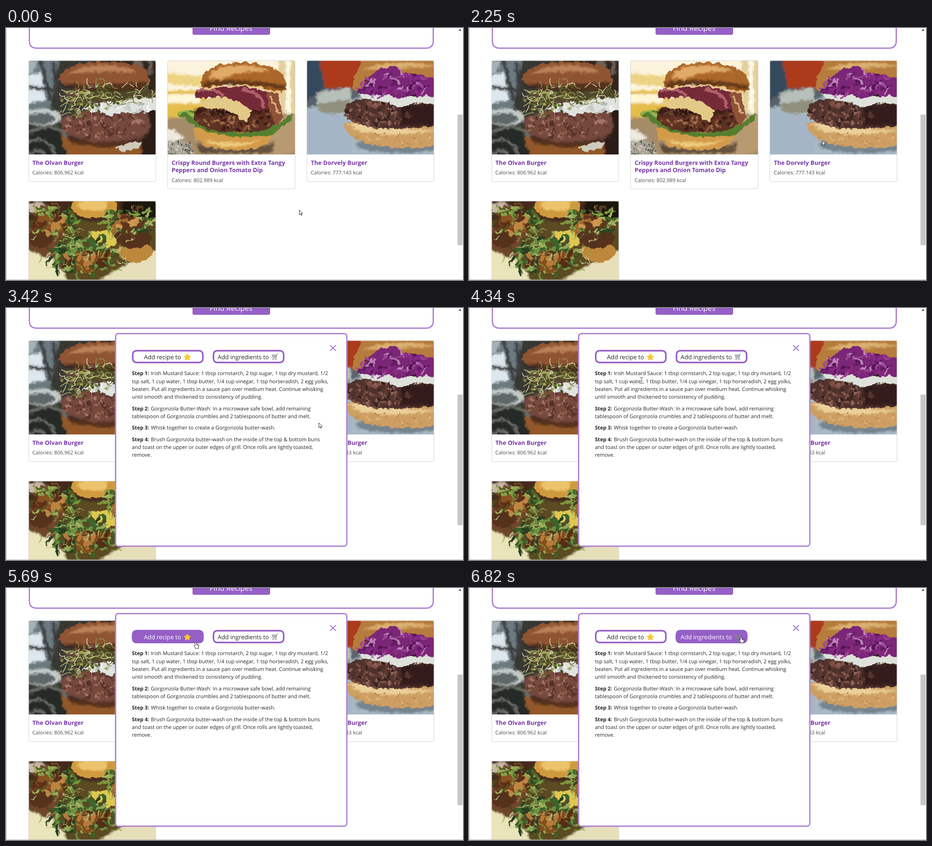
These frames come from a looping animation (1007x556 px, 8000 ms). An HTML page:

```html
<!DOCTYPE html>
<html lang="en">
<head>
<meta charset="utf-8">
<title>Recipe finder</title>
<style>
html, body { margin: 0; width: 100%; height: 100%; overflow: hidden; background: #fff; }
#stage { display: block; width: 1007px; height: 556px; }
text { font: 11.4px "Open Sans", "Noto Sans", sans-serif; fill: #212529; text-rendering: geometricPrecision; white-space: pre; }
.title { font-size: 13px; font-weight: 700; fill: #7636a9; }
.calories { font-size: 11.3px; fill: #4a4d52; }
.button { font-size: 13.2px; }
.light { fill: #fff; }
.bold { font-weight: 700; }
.card { fill: none; stroke: #d3d3d3; }
.frame { fill: none; stroke: #b085d2; stroke-width: 3; }
.shade { fill: #1c0e08; opacity: .5; filter: url(#soft); }
</style>
</head>
<body>
<svg id="stage" viewBox="0 0 1007 556">
  <defs>
    <filter id="soft"><feGaussianBlur stdDeviation="2.2"/></filter>
    <filter id="organic" x="0" y="0" width="1" height="1">
      <feTurbulence type="fractalNoise" baseFrequency=".09" numOctaves="3" seed="4"/>
      <feDisplacementMap in="SourceGraphic" scale="11" xChannelSelector="R" yChannelSelector="G"/>
    </filter>
  </defs>
  <path d="M51.5-20V28Q51.5 44.5 68 44.5H925Q941.5 44.5 941.5 28V-20" class="frame"/>
  <rect x="411" y="-20" width="171" height="35" rx="4" fill="#9560c6"/>
  <text x="496" y="5.8" text-anchor="middle" class="light" style="font-size:16.2px">Find Recipes</text>

  <svg x="50" y="72" width="280" height="207" viewBox="50 72 280 207">
    <rect x="50" y="72" width="280" height="207" fill="#383833"/>
    <g filter="url(#organic)">
      <g filter="url(#soft)">
        <path d="M40 62H118L98 178 40 190Z" fill="#6c7a80"/>
        <path d="M40 108L78 98 88 160 40 168Z" fill="#dde7ee"/>
        <path d="M40 72H72L60 100H40Z" fill="#a5b2b8"/>
        <path d="M74 62L98 160M104 72L112 150M50 130L110 138" stroke="#3c3d3c" stroke-width="8"/>
        <path d="M190 62H340V140L290 150Z" fill="#33261f"/>
        <path d="M280 62H300V90H280ZM314 62H322V104H314Z" fill="#6d625a"/>
        <ellipse cx="80" cy="197" rx="42" ry="19" fill="#c3cbcb"/>
        <ellipse cx="76" cy="200" rx="32" ry="13" fill="#5f6766"/>
        <path d="M40 222H150V289H40Z" fill="#272a28"/>
        <path d="M40 236Q95 205 124 230T142 289M40 256Q92 226 112 289M48 289Q72 248 88 289" fill="none" stroke="#7c8078" stroke-width="4"/>
        <path d="M120 236Q200 268 302 240L306 290H138Z" fill="#93592b"/>
        <path d="M298 180H340V289H298Z" fill="#2c1d16"/>
        <path d="M122 200Q210 160 312 186 326 222 300 246 215 268 140 240 115 222 122 200Z" fill="#754a3c"/>
      </g>
      <g data-scatter="130 216 215 88 30 8 5" data-colors="#8d6050 #54302a #a3766a #65392e #7a4a3c"></g>
      <path d="M136 236Q215 268 300 240L298 254Q210 272 140 252Z" class="shade"/>
      <path d="M128 138Q200 118 330 138V172Q230 182 140 170Z" fill="#504729"/>
      <path d="M168 180Q200 156 226 168 270 150 340 156V184Q301 180 282 190 250 182 236 194 200 184 168 180Z" fill="#dfe2de"/>
      <g data-scatter="28 252 176 78 14 12 4" data-colors="#aeb7b4 #f4f6f3 #c6ccc6"></g>
      <path d="M240 264Q262 252 300 250L292 266 256 272Z" fill="#cfcabb"/>
      <path d="M114 116Q124 82 182 76 268 70 306 90 322 106 312 128 278 140 216 135 145 140 114 116Z" fill="#8f5432"/>
      <path d="M120 122Q200 130 314 118L312 130Q278 142 216 138 145 140 120 122Z" class="shade"/>
      <path d="M135 103Q166 79 232 82 275 85 288 100 208 92 135 103Z" fill="#bb8159" filter="url(#soft)"/>
    </g>
    <g data-scatter="80 228 148 104 24 24 1.5" data-colors="#d3cf99 #8a9350 #e6e0be #5a6a34 #9a9a58"></g>
    <g data-scatter="46 150 168 34 32 26 1.5" data-colors="#bcbf78 #dedcb0 #667438"></g>
    <g data-scatter="40 190 155 74 30 5 5" data-colors="#687c37 #a6a951 #6d4540 #4d5628"></g>
  </svg>

  <svg x="356" y="72" width="281" height="207" viewBox="356 72 281 207">
    <rect x="356" y="72" width="281" height="207" fill="#fbf3dc"/>
    <g filter="url(#organic)">
      <g filter="url(#soft)">
        <path d="M346 98L436 108V130L346 122Z" fill="#edd384"/>
        <path d="M346 138H440V200H346Z" fill="#e4bd4c"/>
        <path d="M346 146H430V166H346Z" fill="#fff6d6"/>
        <path d="M600 62H650V190H604Z" fill="#e3cf9a"/>
        <path d="M622 62V190" stroke="#fffbea" stroke-width="9"/>
        <path d="M346 200Q490 183 650 190V290H346Z" fill="#a58c69"/>
        <path d="M560 205L650 190V260L602 290H540Z" fill="#b79a70"/>
        <path d="M346 236Q364 226 384 246L404 258 424 290H346Z" fill="#a9a497"/>
        <path d="M346 226Q372 218 392 244L372 250 346 248Z" fill="#efe9de"/>
      </g>
      <g data-scatter="80 376 266 40 15 3 2.5" data-colors="#4f4f4a #d5cebf #817b72"></g>
      <path d="M420 255Q500 285 592 252L586 276H430Z" class="shade"/>
      <path d="M414 218Q500 236 592 220 590 256 546 267 458 274 426 252 414 238 414 218Z" fill="#d39b4a"/>
      <path d="M434 246Q492 260 562 246 529 264 483 262 449 259 434 246Z" fill="#f0cc82" filter="url(#soft)"/>
      <path d="M378 188Q396 176 416 184L424 206 448 222 520 232 602 212 630 188 626 205 588 234 556 240 500 240 443 228 404 208Z" fill="#557f2d"/>
      <path d="M380 186Q402 178 416 198L432 216" fill="none" stroke="#93b850" stroke-width="6"/>
      <path d="M413 190Q424 164 492 165 563 155 600 179 606 207 582 222 538 234 466 228 414 219 413 190Z" fill="#5c3022"/>
      <g data-scatter="120 505 198 84 28 6 5" data-colors="#8b5238 #3a1c16 #a3704c #6a3826"></g>
      <path d="M416 176Q500 190 592 170L594 184Q500 200 416 190Z" class="shade"/>
      <path d="M572 140L600 140 604 173 610 199 598 218 582 190Z" fill="#8f5238"/>
      <path d="M582 151L602 190" stroke="#deb084" stroke-width="4"/>
      <path d="M416 139Q438 124 482 132L529 124 576 142 578 180 531 183 493 157 419 154Z" fill="#742a39"/>
      <path d="M421 139Q456 127 477 149M520 136Q563 139 568 177" fill="none" stroke="#b0606c" stroke-width="7"/>
      <path d="M427 165L467 151 500 157 541 181 531 205Q514 208 508 191L477 178 441 178Z" fill="#e3c987"/>
      <path d="M428 128Q430 90 475 80 550 68 598 93 620 108 616 137L600 144 574 138Q530 123 480 124L448 134Z" fill="#ab6629"/>
      <path d="M432 120Q520 108 612 126L614 138Q530 118 434 132Z" class="shade"/>
      <path d="M445 108Q461 82 510 82 560 80 580 97 518 92 473 114Z" fill="#e0aa68" filter="url(#soft)"/>
      <path d="M438 135Q515 116 606 144" fill="none" stroke="#e9c88d" stroke-width="4"/>
    </g>
  </svg>

  <svg x="663" y="72" width="280" height="207" viewBox="663 72 280 207">
    <rect x="663" y="72" width="280" height="207" fill="#a9b9c5"/>
    <g filter="url(#organic)">
      <g filter="url(#soft)">
        <path d="M653 62H778V155L653 178Z" fill="#59626a"/>
        <path d="M688 62H784V130L703 134 690 110Z" fill="#ac3a1a"/>
        <path d="M653 62H689L702 132 653 168Z" fill="#35495d"/>
        <path d="M685 144L758 130 766 178 693 190 685 168Z" fill="#b7bfb9"/>
        <path d="M685 168L758 156 757 184 693 192Z" fill="#8f8f7c"/>
        <path d="M653 180Q725 186 770 208L756 289H653Z" fill="#a4b5c6"/>
        <path d="M850 110H953V230H846Z" fill="#201817"/>
        <ellipse cx="866" cy="258" rx="96" ry="18" fill="#74848f"/>
      </g>
      <path d="M743 210Q780 200 848 212L953 216V258Q881 272 806 258 752 246 743 210Z" fill="#cd9f62"/>
      <path d="M751 213Q781 204 850 220L953 226 850 238 784 229Z" fill="#ecd09a" filter="url(#soft)"/>
      <g data-scatter="50 850 244 90 16 5 3" data-colors="#b98a50 #e0b97c #c79558"></g>
      <path d="M746 179Q753 154 805 157L953 160V216Q862 226 805 219 748 208 746 179Z" fill="#50332d"/>
      <g data-scatter="110 820 190 72 30 8 5" data-colors="#7d5147 #33201c #936255 #5f3a32"></g>
      <path d="M868 168H953V216H868Z" class="shade"/>
      <path d="M778 146Q816 134 856 149L953 150V168L899 166 869 176 844 165 786 156Z" fill="#dde1da"/>
      <path d="M764 134Q764 90 798 62H953V108L800 118 780 142Z" fill="#b67b3d"/>
      <path d="M785 93Q816 76 895 76L953 84 852 90Z" fill="#dbb070" filter="url(#soft)"/>
      <path d="M775 143L800 106 826 90 862 84 869 98 953 112V152L895 146 867 157 837 146 804 149Z" fill="#7b2878"/>
      <g data-scatter="56 857 126 74 24 26 4" data-colors="#9c4698 #511950 #bd82b8 #8a2c86 #651d66"></g>
    </g>
  </svg>

  <svg x="50" y="382" width="280" height="174" viewBox="50 382 280 174">
    <rect x="50" y="382" width="280" height="174" fill="#5b4a22"/>
    <g filter="url(#organic)">
      <g filter="url(#soft)">
        <path d="M40 372H340V425H40Z" fill="#452a1c"/>
        <path d="M256 372H340V420H256Z" fill="#1e1511"/>
        <path d="M40 388L82 384 90 400 40 412Z" fill="#c9b8a4"/>
        <path d="M40 490L96 500 146 566H40Z" fill="#ebe4bb"/>
        <path d="M292 508L340 485V566H190L250 530Z" fill="#e7dfba"/>
        <path d="M40 437H126V498L83 506 40 480Z" fill="#70452a"/>
      </g>
      <ellipse cx="195" cy="394" rx="51" ry="26" fill="#cf993c"/>
      <ellipse cx="190" cy="391" rx="34" ry="13" fill="#ecc46e" filter="url(#soft)"/>
      <ellipse cx="284" cy="492" rx="40" ry="24" fill="#be883b"/>
      <ellipse cx="278" cy="464" rx="42" ry="22" fill="#54301f"/>
      <ellipse cx="76" cy="464" rx="28" ry="20" fill="#54301f"/>
      <path d="M186 450L234 445 246 475 210 494Z" fill="#dfc650"/>
      <g data-scatter="70 100 424 56 28 24 5" data-colors="#45702b #77963f #2f4a20 #9dac58 #6b4a24"></g>
      <g data-scatter="74 272 426 56 30 24 5" data-colors="#41692a #7d9a42 #2a4420 #a4b465 #5b3c20"></g>
      <g data-scatter="110 165 503 72 40 26 6" data-colors="#3b642b #6a9040 #263f20 #94a859 #4c4a20"></g>
      <g data-scatter="22 98 432 40 20 18 9" data-colors="#8a5124 #bd8543 #5a3019"></g>
      <g data-scatter="18 266 430 36 16 21 9" data-colors="#a26a2d #cf9850 #5e361a"></g>
      <g data-scatter="26 180 515 52 24 20 9" data-colors="#84501f #b67a3a #522e18"></g>
      <g data-scatter="50 178 480 118 62 30 1.5" data-colors="#c2cb88 #88a34c"></g>
    </g>
  </svg>

  <path d="M50 279V76Q50 72 54 72H326Q330 72 330 76V335Q330 339 326 339H54Q50 339 50 335Z" class="card"/>
  <rect x="356" y="72" width="281" height="283" rx="4" class="card"/>
  <rect x="663" y="72" width="280" height="267" rx="4" class="card"/>
  <rect x="50" y="382" width="280" height="220" rx="4" class="card"/>
  <text x="58.3" y="301.5" class="title">The Olvan Burger</text>
  <text x="58" y="323" class="calories">Calories: 806.962 kcal</text>
  <text x="365" y="301.5" class="title">Crispy Round Burgers with Extra Tangy</text>
  <text x="365" y="318" class="title">Peppers and Onion Tomato Dip</text>
  <text x="365" y="339.5" class="calories">Calories: 802.989 kcal</text>
  <text x="671.7" y="301.5" class="title">The Dorvely Burger</text>
  <text x="671.5" y="323" class="calories">Calories: 777.143 kcal</text>

  <rect x="994" width="13" height="556" fill="#fdfdfd"/>
  <rect x="995" y="191" width="11" height="288" fill="#c6c6c6"/>
  <path d="M997 6L1000.5 2 1004 6Z" fill="#505050"/>
  <path d="M.5 0V555.5H1007" fill="none" stroke="#b2b2b2"/>

  <g id="modal">
    <rect x="241.5" y="56.5" width="509.5" height="469" rx="6" class="frame" style="fill:#fff"/>
    <path d="M714 82L727 94.5M727 82L714 94.5" stroke="#a979d0" stroke-width="2.2"/>
    <g id="buttons"></g>
    <path d="M399.5 101L401.8 105.5 407 106.3 403.3 110 404.1 115 399.5 112.7 394.9 115 395.7 110 392 106.3 397.2 105.5Z" fill="#fbcb32" stroke="#f6bf28" stroke-linejoin="round"/>
    <g fill="none" stroke="#7d8489">
      <path d="M599.5 101.5H597L594.8 111.5H587.5M586 103.5H596L594.5 109H587.5ZM586.5 106H595.5M589 103.5L590 109M592.7 103.5L592.2 109"/>
      <circle cx="588.5" cy="113.6" r="1.1"/><circle cx="595" cy="113.6" r="1.1"/>
    </g>
    <g id="steps"></g>
  </g>
  <g id="cursor" fill="#fff" stroke="#111" stroke-width=".9" stroke-linejoin="round">
    <path id="arrow" d="M.4.5V11.2L2.8 8.9 4.6 12.6 6.2 11.9 4.5 8.3H7.8Z"/>
    <path id="hand" d="M-1.4 7.8V1Q0-.9 1.4 1V5L5.5 5.8Q7.3 6.2 7.1 8.2L6.4 11.5V14.2H-1V12.2L-4 8.5Q-3.4 6.6-1.4 8.4ZM3 5.4V8M5 5.8V8.2"/>
    <g id="beam" fill="none">
      <path d="M-3-6.3H3M-3 6.3H3M0-6V6" stroke="#fff" stroke-width="2.6"/>
      <path d="M-3.2-6.3H-.8L0-5.7 .8-6.3H3.2M-3.2 6.3H-.8L0 5.7 .8 6.3H3.2M0-5.7V5.7" stroke="#333"/>
    </g>
  </g>
</svg>
<script>
const LOOP = 8000, MODAL_OPENS = 2280, HOVER_FADE = 300;
const $ = id => document.getElementById(id);
const clamp = v => Math.min(1, Math.max(0, v));

// Photo texture: curved strokes spread over an ellipse.
// data-scatter holds: count cx cy rx ry length width
let seed = 7;
const random = () => (seed = seed * 16807 % 2147483647) / 2147483647;
for (const group of document.querySelectorAll('[data-scatter]')) {
  const [count, cx, cy, rx, ry, length, width] = group.dataset.scatter.split(' ').map(Number);
  const colors = group.dataset.colors.split(' ');
  let strokes = '';
  for (let i = 0; i < count; i++) {
    const radius = Math.sqrt(random()), around = random() * 2 * Math.PI, turn = random() * 2 * Math.PI;
    const x = cx + rx * radius * Math.cos(around), y = cy + ry * radius * Math.sin(around);
    const size = length * (.4 + .6 * random()), bend = size * (random() - .5);
    const dx = size * Math.cos(turn), dy = size * Math.sin(turn) * .7;
    strokes += `<path d="M${x} ${y}q${dx / 2 - bend} ${dy / 2 + bend} ${dx} ${dy}" stroke="${colors[i % colors.length]}"/>`;
  }
  group.innerHTML = `<g fill="none" stroke-linecap="round" stroke-width="${width}">${strokes}</g>`;
}

const steps = [
  ['Irish Mustard Sauce: 1 tbsp cornstarch, 2 tsp sugar, 1 tsp dry mustard, 1/2',
   'tsp salt, 1 cup water, 1 tbsp butter, 1/4 cup vinegar, 1 tsp horseradish, 2 egg yolks,',
   'beaten. Put all ingredients in a sauce pan over medium heat. Continue whisking',
   'until smooth and thickened to consistency of pudding.'],
  ['Gorgonzola Butter-Wash: In a microwave safe bowl, add remaining',
   'tablespoon of Gorgonzola crumbles and 2 tablespoons of butter and melt.'],
  ['Whisk together to create a Gorgonzola butter-wash.'],
  ['Brush Gorgonzola butter-wash on the inside of the top &amp; bottom buns',
   'and toast on the upper or outer edges of grill. Once rolls are lightly toasted,',
   'remove.'],
];
let baseline = 148.4;
$('steps').innerHTML = steps.map((lines, i) => {
  const html = lines.map((line, j) => {
    const lead = j ? '' : `<tspan class="bold">Step ${i + 1}:</tspan><tspan x="319.2">`;
    return `<text x="277.5" y="${baseline + j * 17.15}">${lead}${line}${j ? '' : '</tspan>'}</text>`;
  }).join('');
  baseline += lines.length * 17.15 + 8.5;
  return html;
}).join('');

const buttons = [
  { x: 277.5, textX: 304, label: 'Add recipe to', enter: 4500, leave: 5715 },
  { x: 455.5, textX: 466.3, label: 'Add ingredients to', enter: 6520, leave: LOOP },
];
$('buttons').innerHTML = buttons.map(({ x, textX, label }) => `
  <rect x="${x + 1.75}" y="94.25" width="154.5" height="26" rx="8" fill="#fff" stroke="#9560c6" stroke-width="3.5"/>
  <text x="${textX}" y="112.6" class="button">${label}</text>
  <g class="hover">
    <rect x="${x}" y="92.5" width="158" height="29.5" rx="9.5" fill="#9560c6"/>
    <text x="${textX}" y="112.6" class="button light">${label}</text>
  </g>`).join('');
const hovers = document.querySelectorAll('.hover');
const textBoxes = [...$('steps').children].map(line => line.getBBox());

const ease = {
  hold: () => 0,
  linear: u => u,
  start: u => u * u,
  stop: u => u * (2 - u),
  both: u => u * u * (3 - 2 * u),
};
// time, x, y, easing towards the next point
const route = [
  [0, 646, 401, 'hold'], [470, 646, 401, 'both'], [1080, 778, 248, 'hold'],
  [3060, 778, 248, 'start'], [3420, 691, 253, 'stop'], [3820, 377, 236.5, 'hold'],
  [4160, 377, 236.5, 'start'], [4340, 380, 160, 'stop'], [4600, 412, 115.5, 'hold'],
  [5610, 412, 115.5, 'both'], [6270, 545, 198, 'linear'], [6400, 563, 184, 'hold'],
  [6430, 563, 184, 'both'], [6570, 598.5, 106.5, 'hold'], [LOOP, 598.5, 106.5, 'hold'],
];

function cursorAt(t) {
  const i = route.findIndex(point => point[0] > t) - 1;
  const [t0, x0, y0, easing] = route[i], [t1, x1, y1] = route[i + 1];
  const u = ease[easing]((t - t0) / (t1 - t0));
  return [x0 + (x1 - x0) * u, y0 + (y1 - y0) * u];
}

function cursorShape(t, x, y) {
  if (t < MODAL_OPENS) return 'arrow';
  if (buttons.some(b => x > b.x && x < b.x + 158 && y > 92 && y < 122)) return 'hand';
  const overText = textBoxes.some(b => x > b.x && x < b.x + b.width && y > b.y - 1 && y < b.y + b.height + 1);
  return overText ? 'beam' : 'arrow';
}

function draw(now) {
  const t = now % LOOP, [x, y] = cursorAt(t), shape = cursorShape(t, x, y);
  $('modal').style.visibility = t < MODAL_OPENS ? 'hidden' : 'visible';
  buttons.forEach(({ enter, leave }, i) => {
    const level = clamp((t - enter) / HOVER_FADE) - clamp((t - leave) / HOVER_FADE);
    hovers[i].style.opacity = ease.both(level);
  });
  $('cursor').setAttribute('transform', `translate(${Math.round(x)} ${Math.round(y)})`);
  for (const id of ['arrow', 'hand', 'beam']) $(id).style.display = id === shape ? '' : 'none';
}

const started = performance.now();
function tick() {
  draw(performance.now() - started);
  requestAnimationFrame(tick);
}
tick();
</script>
</body>
</html>
```
